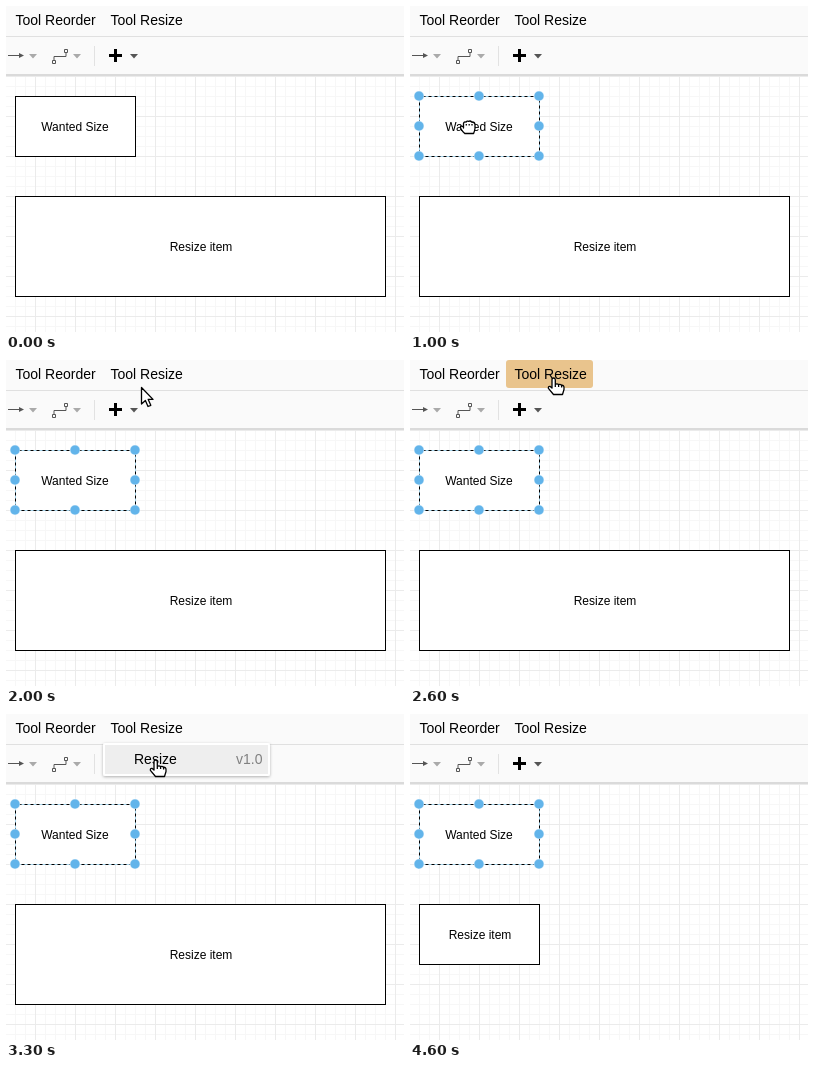
An HTML page that plays this animation: 398x326 px, repeating every 5.3 s.

```html
<!DOCTYPE html>
<html lang="en">
<head>
<meta charset="utf-8">
<style>
  html, body { margin: 0; width: 100%; height: 100%; overflow: hidden; background: #fff; }
  svg { display: block; }
  text { font: 14px Arial, "Liberation Sans", sans-serif; fill: #000; white-space: pre; }
  .label { font-size: 12px; text-anchor: middle; }
  .box { fill: #fff; stroke: #000; }
  .cursor { fill: #fff; stroke: #000; stroke-width: 1.3; stroke-linejoin: round; }
</style>
</head>
<body>
<svg width="398" height="326" viewBox="0 0 398 326">
  <defs>
    <pattern id="grid" x="29" y="70" width="40" height="40" patternUnits="userSpaceOnUse">
      <path d="M10.5 0V40M20.5 0V40M30.5 0V40M0 10.5H40M0 20.5H40M0 30.5H40" stroke="#f7f7f7"/>
      <path d="M.5 0V40M0 .5H40" stroke="#ebebeb"/>
    </pattern>
    <filter id="shadow" x="-10%" y="-30%" width="120%" height="170%">
      <feDropShadow dx="0" dy="1" stdDeviation="1.6" flood-opacity=".3"/>
    </filter>
  </defs>

  <rect y="69" width="398" height="257" fill="url(#grid)"/>
  <rect class="box" x="9.5" y="90.5" width="120" height="60"/>
  <text class="label" x="69" y="125">Wanted Size</text>
  <rect class="box" id="item" x="9.5" y="190.5"/>
  <text class="label" id="itemLabel">Resize item</text>

  <path id="arrows" fill="#dff0fc" d="M66 69h6v4h-6z
    M146 117h11v-4.5l11 7.5-11 7.5V123h-11z M66 167h6v11h4.5L69 189l-7.5-11H66z"/>
  <path id="points" fill="none" stroke="#4599b5"/>
  <g id="selection">
    <rect x="9.5" y="90.5" width="120" height="60" fill="none" stroke="#a5d3ea" stroke-dasharray="3"/>
    <g id="handles" fill="#62b4ea" stroke="#fff" stroke-opacity=".5"/>
  </g>

  <rect width="398" height="69" fill="#fafafa"/>
  <path d="M0 30.5H398" stroke="#e0e0e0"/>
  <path d="M0 69H398" stroke="#dadada" stroke-width="2"/>
  <rect id="active" x="96" width="87" height="28" rx="3" fill="#e9c48d"/>
  <text x="9.5" y="19">Tool Reorder</text>
  <text x="104.5" y="19">Tool Resize</text>

  <g fill="none" stroke="#555">
    <path d="M2 49.5H14"/>
    <path d="M13 47l5 2.5-5 2.5z" fill="#555" stroke="none"/>
    <path d="M46.5 54.5h3v3h-3zM58.5 43.5h3v3h-3zM48 54V50.5H60V47"/>
  </g>
  <path d="M23 48h8l-4 4.5zM67 48h8l-4 4.5z" fill="#aaa"/>
  <path d="M124 48h8l-4 4.5z" fill="#555"/>
  <path d="M88.5 40V60" stroke="#e2e2e2"/>
  <path d="M109.5 43V56M103 49.5H116" stroke="#000" stroke-width="3"/>

  <g id="menu">
    <rect x="97" y="29" width="167" height="33" rx="2" fill="#fff" filter="url(#shadow)"/>
    <rect id="row" x="99" y="31" width="163" height="29" fill="#eee"/>
    <text x="128" y="50">Resize</text>
    <text x="230" y="50" style="fill:#808080">v1.0</text>
  </g>

  <path class="cursor" id="grab" d="M-4.5 1V-3.5Q-4-5.6-2-4.9Q-1-6.6 .6-5.6Q2.4-6.6 3.6-5Q6.8-5.2 7-2.5V1.5
    Q6.6 4 5.6 6.5H-3.2Q-7.6 2.5-7.6-.2Q-7-1.8-4.5 0ZM-1.7-3v1.5M1.2-3v1.5M4-3v1.5"/>
  <path class="cursor" id="arrow" d="M.5.5V17L4.4 13.4 7 19.5 9.8 18.3 7.2 12.4H12Z"/>
  <path class="cursor" id="hand" d="M-2 10V1.7Q-2 0-.4 0T1.3 1.7V6.4Q3 5.2 4.6 6.6Q6.3 5.8 7.6 7.3Q10 7 10 9.5V11.5
    L8.5 16.5H-.5L-5.6 10.4Q-6 8-3.8 8.4L-2 10ZM1.3 6.4V9M4.6 6.6V9M7.6 7.3V9.5"/>
</svg>
<script>
const LOOP = 5300;
const el = id => document.getElementById(id);
const between = (t, from, to) => t >= from && t < to;
const show = (id, opacity) => el(id).setAttribute("opacity", +opacity);
const setAll = (id, attrs) => {
  for (const name in attrs) el(id).setAttribute(name, attrs[name]);
};

// Pointer stops: start time, shape, x, y
const stops = [
  [0], [400, "grab", 8, 125], [500, "grab", 38, 123], [600, "grab", 58, 121],
  [1600, "grab", 99, 105], [1700, "arrow", 112, 85], [1800, "arrow", 122, 62],
  [1900, "arrow", 130, 41], [2000, "arrow", 135, 27], [2100, "arrow", 139, 21],
  [2200, "arrow", 141, 17], [2400, "hand", 144, 18], [3100, "hand", 146, 26],
  [3200, "hand", 149, 39], [3300, "hand", 150, 46], [3800, "arrow", 150, 46],
  [4400, "arrow", 152, 32], [4500, "arrow", 154, 12], [4600]
];

let marks = "";
const mark = (x, y) => marks += `M${x - 2} ${y - 2}l5 5m0-5l-5 5`;
for (const y of [90, 150]) for (const x of [39, 69, 99]) mark(x, y);
for (const x of [9, 129]) for (const y of [105, 120, 135]) mark(x, y);
el("points").setAttribute("d", marks);

for (const x of [9, 69, 129])
  for (const y of [90, 120, 150])
    if (x !== 69 || y !== 120)
      el("handles").innerHTML += `<circle cx="${x}" cy="${y}" r="5"/>`;

function render(now) {
  const t = now % LOOP;
  const [, shape, x, y] = stops.findLast(stop => stop[0] <= t);
  for (const id of ["grab", "arrow", "hand"]) show(id, id === shape);
  if (shape) el(shape).setAttribute("transform", `translate(${x} ${y})`);

  show("points", between(t, 400, 1000));
  show("arrows", between(t, 500, 1000) || between(t, 1100, 1700));
  show("selection", t >= 1000);
  show("active", between(t, 2600, 2700) + between(t, 2700, 2800) / 2);
  show("menu", between(t, 2700, 3800));
  show("row", t >= 3200);

  const [width, height] = t < 3800 ? [370, 100] : [120, 60];
  setAll("item", { width, height });
  setAll("itemLabel", { x: 10 + width / 2, y: 195 + height / 2 });
  requestAnimationFrame(() => render(performance.now()));
}
render(0);
</script>
</body>
</html>
```
